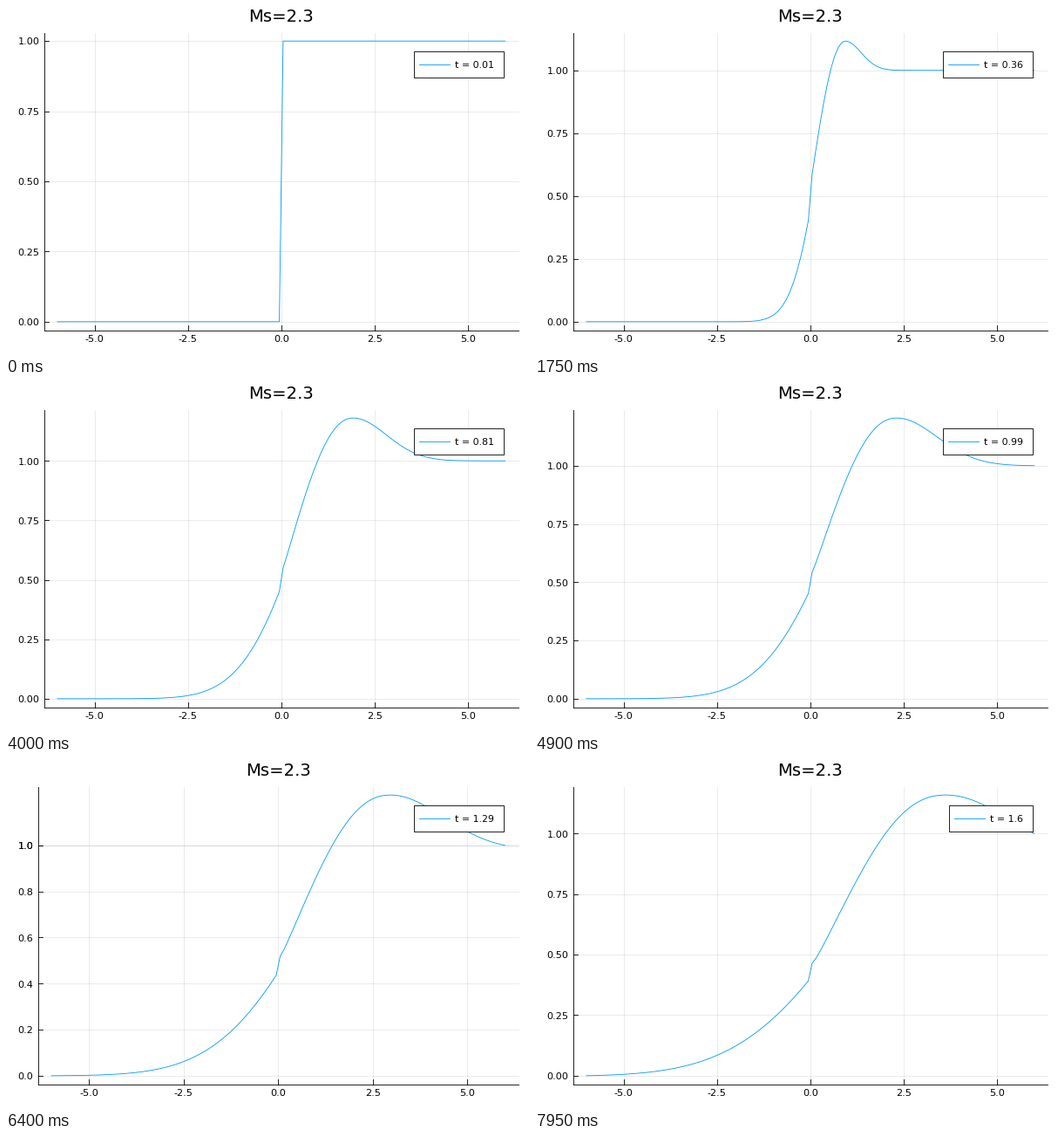
Recreate the animation shown at these times as a matplotlib script. Size 600 by 400 pixels, loop 8 s.

```python
import math

import numpy as np
import matplotlib.pyplot as plt
from matplotlib.animation import FuncAnimation
from matplotlib.patches import Rectangle

W, H, DPI = 600, 400, 100
FRAMES, INTERVAL = 160, 50
PT = 72 / DPI                      # points per pixel
TOP, BOTTOM, RIGHT = 30.5, 371.5, 588
BLUE = "#009AFA"
THIN = 0.85 * PT

plt.rcParams["font.family"] = "DejaVu Sans"
plt.rcParams["axes.unicode_minus"] = False

fig = plt.figure(figsize=(W / DPI, H / DPI), dpi=DPI, facecolor="white")
ax = fig.add_axes([0, 0, 1, 1])

grid_x = np.linspace(-6, 6, 120)
erf = np.vectorize(math.erf)


def cdf(z):
    return 0.5 * (1 + erf(z / math.sqrt(2)))


def profile(t):
    """Spreading shock front, scaled so that its ends are 0 and 1."""
    s = t - 0.01
    # upstream side: a Gaussian tail that widens with time
    mid = 0.155 * (1 - math.exp(-s / 0.03)) + 0.63 * s + 0.165 * s * s
    sigma = math.sqrt(0.32 * s + 2.47 * s * s) + 1e-3
    left = 1.644 * cdf((grid_x - mid) / sigma)

    # downstream side: rise to a travelling hump, then a Gaussian decay to 1
    crest = max(0.18 * (1 - math.exp(-s / 0.1)) + 2.18 * s, 1e-3)
    hump = (0.07 + 0.138 * s) * (1 - math.exp(-(s / 0.1325) ** 1.5))
    width = 0.06 + 1.04 * s
    start = 0.545 - 0.036 * s
    bend = 1.45 + 0.4 * s
    u = np.clip(1 - grid_x / crest, 0, 1)
    drop = ((1 - np.cos(bend * u)) / (1 - math.cos(bend))) ** (1 + 0.1 * s)
    rise = 1 + hump - (1 + hump - start) * drop
    rise += 0.015 * s * np.exp(-np.abs(grid_x) / 0.1)
    decay = 1 + hump * np.exp(-((grid_x - crest) / width) ** 2 / 2)
    right = np.where(grid_x < crest, rise, decay)

    raw = np.where(grid_x < 0, left, right)
    return (raw - raw[0]) / (raw[-1] - raw[0])


def line(xs, ys, color="black", **kw):
    ax.plot(xs, ys, color=color, lw=THIN, **kw)


def text(x, y, label, size=11.2, ha="center"):
    ax.text(x, y, label, fontsize=size * PT, ha=ha, va="baseline",
            color="black", zorder=6)


def legend(label):
    x = 515 + 7 * (8 - len(label))
    ax.add_patch(Rectangle((x - 47.5, 51.5), 570.5 - (x - 47.5), 30,
                           facecolor="white", edgecolor="black",
                           lw=THIN, zorder=4))
    line([x - 41, x - 6], [66.5, 66.5], BLUE, zorder=5)
    text(x, 71, label, size=11, ha="left")


def draw(i):
    ax.clear()
    ax.set_xlim(0, W)
    ax.set_ylim(H, 0)
    ax.axis("off")

    t = round(0.01 * (i + 1), 2)
    values = profile(t)
    peak = values.max()

    # the tick step changes once 1.25 would fit inside the padded range
    if 1.03 * peak >= 1.25:
        x0, fmt = 36.5, "{:.1f}"
        yticks = [0, 0.2, 0.4, 0.6, 0.8, 1, 1]
    else:
        x0, fmt = 43.5, "{:.2f}"
        yticks = [0, 0.25, 0.5, 0.75, 1]

    def px(v):
        return x0 + (RIGHT - x0) * (v + 6.36) / 12.72

    def py(v):
        return BOTTOM - (BOTTOM - TOP) * (v / peak + 0.03) / 1.06

    for v in (-5, -2.5, 0, 2.5, 5):
        x = px(v)
        line([x, x], [TOP, BOTTOM], alpha=0.09, zorder=1)
        line([x, x], [BOTTOM, BOTTOM - 5.5], zorder=2)
        text(x, 385, f"{v:.1f}")
    for v in yticks:
        y = py(v)
        line([x0, RIGHT], [y, y], alpha=0.09, zorder=1)
        line([x0, x0 + 5.5], [y, y], zorder=2)
        text(x0 - 5, y + 4.3, fmt.format(v), ha="right")

    line([x0, x0], [TOP, BOTTOM], zorder=2)
    line([x0, RIGHT], [BOTTOM, BOTTOM], zorder=2)
    line(px(grid_x), py(values), BLUE, zorder=3)
    text((x0 + RIGHT) / 2, 18.3, "Ms=2.3", size=19.6)
    legend(f"t = {t}")
    return []


anim = FuncAnimation(fig, draw, frames=FRAMES, interval=INTERVAL,
                     init_func=lambda: draw(0), repeat=True, repeat_delay=0)
plt.show()
```
